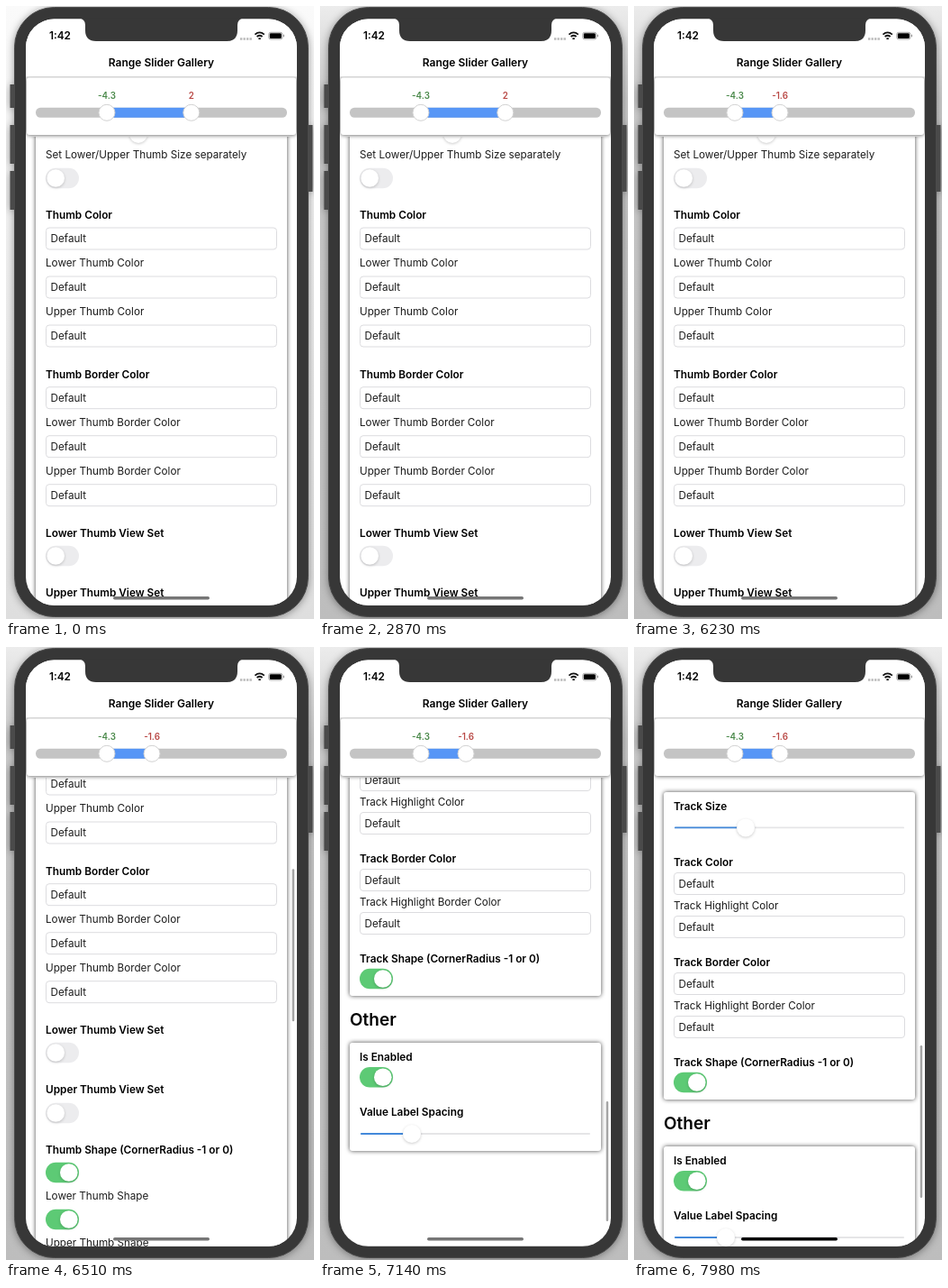
An HTML page that plays this animation: 342 by 680 pixels, repeating every 8 s.

```html
<!DOCTYPE html>
<html lang="en">
<head>
<meta charset="utf-8">
<title>Range slider demo</title>
<style>
  html, body { margin: 0; width: 100%; height: 100%; overflow: hidden; }
  svg { display: block; width: 342px; height: 680px; }
  text { font: 11.7px Inter, Roboto, sans-serif; fill: #1c1c1c; }
  .bold { font-weight: 600; font-size: 11.8px; fill: #000; }
  .heading { font-weight: 600; font-size: 19px; fill: #000; }
  .value { font-weight: 600; font-size: 9.8px; text-anchor: middle; }
  .card { fill: #fff; filter: drop-shadow(0 0 2.4px #000b); }
  .entry { fill: #fff; stroke: #dcdcdf; }
  .knob { fill: #fff; filter: drop-shadow(0 1px 1.5px #0003); }
  .thumb { fill: #fff; stroke: #d2d2d2; }
  .phone { filter: drop-shadow(0 1px 4px #0006); }
</style>
</head>
<body>
<svg viewBox="0 0 342 680">
  <defs>
    <linearGradient id="light" x2="0" y2="1">
      <stop stop-color="#fafafa"/><stop offset="1" stop-color="#dedede"/>
    </linearGradient>
    <linearGradient id="dark" x2="0" y2="1">
      <stop stop-color="#ececec"/><stop offset=".15" stop-color="#cacaca"/><stop offset="1" stop-color="#bdbdbd"/>
    </linearGradient>
    <clipPath id="screen"><rect x="22" y="14.5" width="301" height="650.3" rx="31.5"/></clipPath>
    <clipPath id="page"><rect x="22" y="145" width="301" height="520"/></clipPath>
  </defs>

  <rect id="backdrop" width="342" height="680"/>
  <g class="phone">
    <path d="M7 87v26M7 132v43M7 183v43M338 132v74" stroke="#4a4a4a" stroke-width="5"/>
    <rect x="9.5" y="1.5" width="326" height="676" rx="44" fill="#373737" stroke="#4b4b4b"/>
  </g>

  <g clip-path="url(#screen)">
    <rect x="22" y="14" width="301" height="651" fill="#fff"/>
    <g clip-path="url(#page)"><g id="content"></g></g>
    <rect id="scrollbar" x="317.7" width="2.5" rx="1.2" fill="#a5a5a5"/>

    <rect class="card" x="23" y="79" width="299" height="64" rx="3"/>
    <rect x="22" y="14" width="301" height="64.5" fill="#fff"/>
    <path d="M22 79h301" stroke="#d2d2d2"/>
    <text class="bold" x="172.5" y="67.4" text-anchor="middle" style="font-size:12px">Range Slider Gallery</text>

    <rect x="33" y="112.8" width="279" height="11" rx="5.2" fill="#c4c4c4"/>
    <rect id="range" y="112.8" height="11" fill="#5796f6"/>
    <circle id="lowerThumb" class="thumb" cy="118.3" r="9"/>
    <circle id="upperThumb" class="thumb" cy="118.3" r="9"/>
    <text id="lowerText" class="value" y="103" style="fill:#4b8a4b"></text>
    <text id="upperText" class="value" y="103" style="fill:#b94845"></text>

    <rect id="home" x="119" y="655" width="107" height="3.4" rx="1.7"/>
  </g>

  <path d="M81 13.5Q88 14.5 88 21V27Q88 39 100 39H245Q257 39 257 27V21Q257 14.5 264 13.5Z" fill="#373737"/>
  <text class="bold" x="48" y="37.3">1:42</text>
  <path d="M260 36.5h13" stroke="#bbb" stroke-width="2.4" stroke-dasharray="2.4 1.1"/>
  <g fill="none" stroke="#111" stroke-width="1.8">
    <path d="M276.4 31.6q5.2-4.4 10.4 0M278.6 34q3-2.5 6 0"/>
    <path d="M280.4 36.2h2.4"/>
  </g>
  <rect x="291.8" y="29.3" width="15" height="7.6" rx="2" fill="none" stroke="#8c8c8c" stroke-width=".8"/>
  <rect x="292.8" y="30.2" width="13" height="5.8" rx="1.2" fill="#000"/>
  <path d="M308.4 31.8v2.4" stroke="#999" stroke-width="1.2"/>
</svg>

<script>
const $ = id => document.getElementById(id);
const set = (node, attrs) => {
  for (const name in attrs) node.setAttribute(name, attrs[name]);
  return node;
};
const add = (tag, attrs, label = '') => {
  const node = set(document.createElementNS('http://www.w3.org/2000/svg', tag), attrs);
  node.textContent = label;
  $('content').append(node);
};
const bar = (x, y, width, height, fill) =>
  add('rect', { x, y: y - height / 2, width, height, rx: height / 2, fill });
const knob = (cx, cy, r) => add('circle', { class: 'knob', cx, cy, r });

// Parts of the scrolling page; y is the vertical centre at scroll 0.
const text = (y, label, style = '', x = 44) => add('text', { x, y: y + 4.3, class: style }, label);
const bold = (y, label) => text(y + .6, label, 'bold');
const heading = (y, label) => add('text', { x: 33, y: y + 7, class: 'heading' }, label);
const card = (top, bottom) =>
  add('rect', { class: 'card', x: 33, y: top, width: 279, height: bottom - top, rx: 3 });
const entry = y => {
  add('rect', { class: 'entry', x: 44.5, y: y - 12, width: 256, height: 24, rx: 3.5 });
  text(y, 'Default', '', 49.5);
};
const toggle = (y, on) => {
  bar(44, y, 37, 22.5, on ? '#5dca75' : '#ececee');
  knob(on ? 69.8 : 55.2, y, 9.8);
};
const slider = (y, x) => {
  bar(45, y, 255, 1.8, '#e5e5e7');
  bar(45, y, x - 45, 1.8, '#4389da');
  knob(x, y, 10);
};

card(0, 865);
slider(142, 147);
text(165, 'Set Lower/Upper Thumb Size separately');
toggle(191);
['Color', 'Border Color'].forEach((kind, i) => {
  const y = 231 + i * 176.7;
  bold(y, 'Thumb ' + kind);
  text(y + 54, 'Lower Thumb ' + kind);
  text(y + 108, 'Upper Thumb ' + kind);
  for (const row of [27, 81, 135]) entry(y + row);
});
bold(584, 'Lower Thumb View Set');
toggle(610);
bold(650, 'Upper Thumb View Set');
toggle(677);
bold(717, 'Thumb Shape (CornerRadius -1 or 0)');
toggle(743, true);
text(769, 'Lower Thumb Shape');
toggle(795, true);
text(821, 'Upper Thumb Shape');
toggle(846.5, true);

heading(892, 'Track');
card(918, 1259);
bold(933, 'Track Size');
slider(957.4, 124);
['Color', 'Border Color'].forEach((kind, i) => {
  const y = 995 + i * 111;
  bold(y, 'Track ' + kind);
  entry(y + 24.5);
  text(y + 48.5, 'Track Highlight ' + kind);
  entry(y + 72.5);
});
bold(1217, 'Track Shape (CornerRadius -1 or 0)');
toggle(1240, true);

heading(1285, 'Other');
card(1311, 1431);
bold(1326, 'Is Enabled');
toggle(1349.3, true);
bold(1387, 'Value Label Spacing');
slider(1412, 102);

// Linear interpolation through [time, value] pairs.
const along = (points, t) => {
  const next = points.findIndex(p => p[0] > t);
  if (next < 0) return points[points.length - 1][1];
  if (!next) return points[0][1];
  const [t0, a] = points[next - 1], [t1, b] = points[next];
  return a + (b - a) * (t - t0) / (t1 - t0);
};
const lowerPath = [[1960, -4.3], [2170, -3.8], [2450, -2.8], [2520, -2.8], [2730, -3.8], [2870, -4.3]];
const upperPath = [[4270, 2], [4340, 1.6], [4480, .2], [4620, -.7], [4760, -1.3], [4900, -1.6]];
const scrollPath = [
  [6230, 0], [6300, 10], [6370, 40], [6440, 90], [6580, 230], [6790, 489], [6930, 692],
  [7000, 785], [7070, 838], [7140, 872], [7210, 878], [7280, 878], [7350, 872],
  [7490, 845], [7770, 785], [7910, 761], [7980, 757]
];
const LOOP = 8000, STEP = 70, UNIT = 12.15, MAX_SCROLL = 836;

function draw(t) {
  const lower = +along(lowerPath, t).toFixed(1);
  const upper = +along(upperPath, t).toFixed(1);
  const lowerX = 42.7 + (lower + 10) * UNIT;
  const upperX = 60 + (upper + 10) * UNIT;
  set($('range'), { x: lowerX, width: upperX - lowerX });
  set($('lowerThumb'), { cx: lowerX });
  set($('upperThumb'), { cx: upperX });
  set($('lowerText'), { x: lowerX }).textContent = lower;
  set($('upperText'), { x: upperX }).textContent = upper;

  const scroll = along(scrollPath, t);
  const over = Math.max(0, scroll - MAX_SCROLL);
  set($('content'), { transform: `translate(0 ${-scroll})` });
  set($('scrollbar'), {
    y: 193.7 + .328 * (scroll - over) + over,
    height: 169 - over,
    opacity: scroll > 0 ? 1 : 0
  });

  const grey = along([[7350, 118], [7700, 0]], t);
  set($('home'), { fill: `rgb(${grey},${grey},${grey})` });
  set($('backdrop'), { fill: t < 770 ? 'url(#light)' : 'url(#dark)' });
}

const start = performance.now();
function tick() {
  const t = (performance.now() - start) % LOOP;
  draw(Math.floor(t / STEP) * STEP);
  requestAnimationFrame(tick);
}
tick();
</script>
</body>
</html>
```
